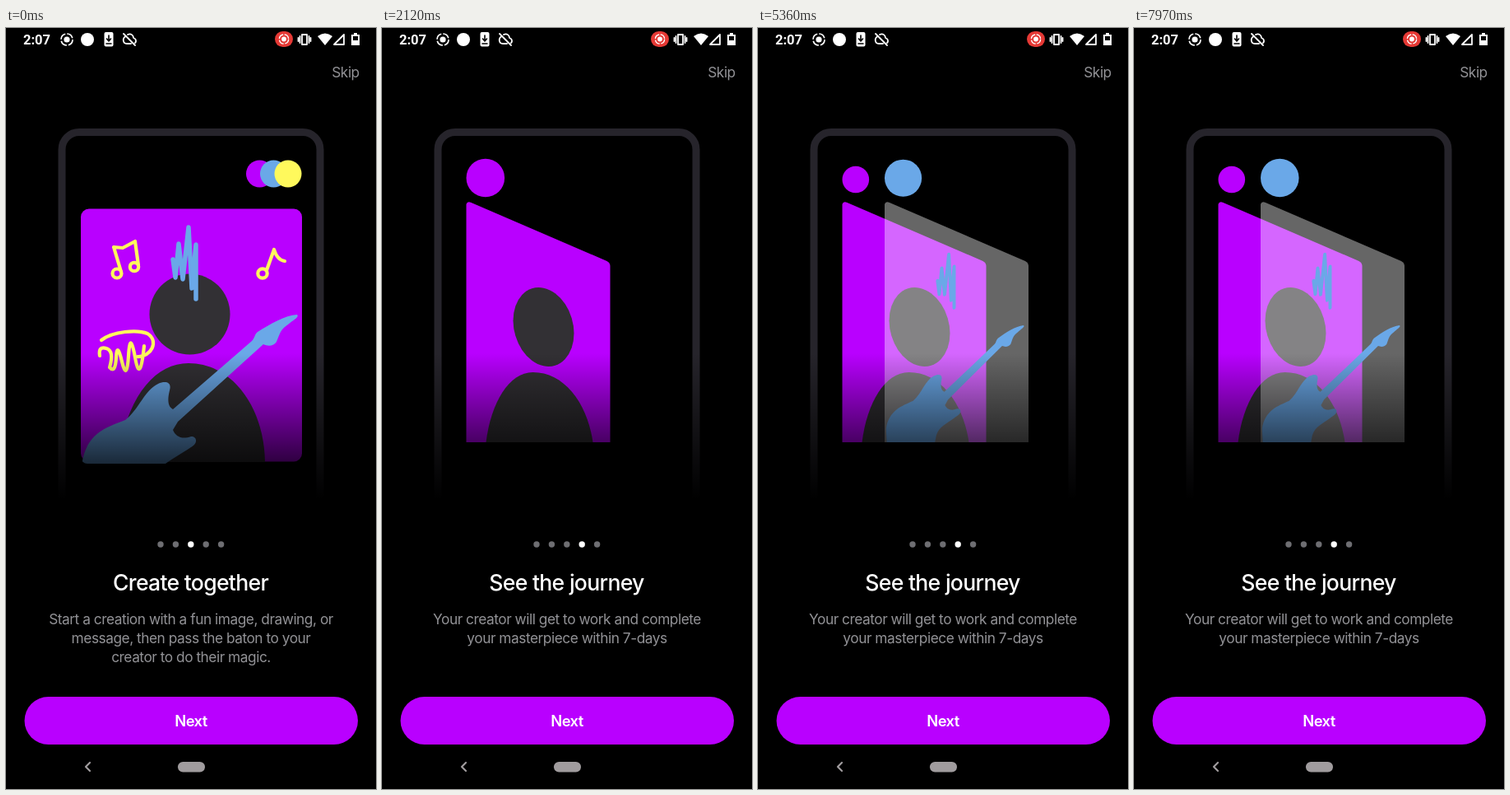
These frames come from a looping animation (450x924 px, 8 s). An HTML page:

```html
<!DOCTYPE html>
<html lang="en">
<head>
<meta charset="utf-8">
<title>Onboarding</title>
<style>
  html, body { margin: 0; width: 100%; height: 100%; overflow: hidden; background: #000; }
  svg { display: block; width: 100%; height: 100%; }
  text { font-family: Inter, "Open Sans", sans-serif; text-anchor: middle; }
  .title { font-size: 26.6px; font-weight: 500; letter-spacing: -.027em; fill: #fff; }
  .copy { font-size: 17.3px; letter-spacing: -.027em; fill: #929296; }
  .next { font-size: 18.4px; font-weight: 600; letter-spacing: -.03em; fill: #fff; }
  .clock { font: 700 16.5px Roboto, sans-serif; fill: #fff; }
  .line { fill: none; stroke-linecap: round; stroke-linejoin: round; }
  .yellow { stroke: #fff95c; stroke-width: 4.2; }
  .white { stroke: #fff; stroke-width: 1.8; }
</style>
</head>
<body>
<svg viewBox="0 0 450 924" preserveAspectRatio="none">
  <defs>
    <linearGradient id="fade" x2="0" y2="1">
      <stop offset="0" stop-opacity="0"/>
      <stop offset="1"/>
    </linearGradient>
    <clipPath id="cardClip"><rect x="91" y="219" width="269" height="310" rx="8"/></clipPath>
    <clipPath id="screenClip"><rect x="73" y="131" width="286.5" height="372"/></clipPath>
    <path id="phone" class="line" stroke="#26242b" stroke-width="9" d="M68 572V147.500a21 21 0 0 1 21-21H361a21 21 0 0 1 21 21V572"/>
    <path id="pane" d="M0 214Q1 210 6 212L171 283Q175 285 175 289V503H0Z"/>
    <path id="guitar" fill="#6aa8e8" d="M354 348C339 349 322 359 306 369C302 372 303 376 299 380L203 463C197 460 196 452 199 440C202 430 194 428 185 432C168 440 162 463 145 476C125 484 100 490 93 525V570H178L184 545Q187 535 194 529C205 521 222 512 229 506C233 501 231 496 225 496C214 500 206 496 203 488L209 478L313 384C319 387 326 386 329 381C334 370 333 367 343 360C350 354 357 351 354 348Z"/>
    <path id="hair" class="line" stroke="#6aa8e8" stroke-width="5.500" d="M203 281L206 303L210 262L215 305L222 242L226 316L231 263V329"/>
    <path id="scribble" class="line yellow" d="M116 379C130 368 160 366 172 371C187 380 176 400 160 399M114 398Q112 386 122 389T126 412Q133 420 134 400T141 405T149 398T157 400T168 386"/>
    <g id="target">
      <circle r="7" fill="none" stroke="#fff" stroke-width="1.700" stroke-dasharray="9 2"/>
      <circle r="3.600" fill="#fff"/>
    </g>
  </defs>

  <rect width="450" height="924"/>

  <g id="phoneOut">
    <use href="#phone"/>
    <circle cx="308.500" cy="177" r="16.500" fill="#b900ff"/>
    <circle cx="325.500" cy="177" r="16.500" fill="#6aa8e8"/>
    <circle cx="343" cy="177" r="16.500" fill="#fff95c"/>
    <rect x="91" y="219.500" width="269" height="307" rx="10" fill="#b900ff"/>
    <circle cx="223.500" cy="347.500" r="49" fill="#323034"/>
    <path fill="#323034" d="M136 527C145 450 180 407 222 407C275 407 314 460 315 527Z"/>
    <use href="#hair"/>
    <use href="#guitar" clip-path="url(#cardClip)"/>
    <g class="line yellow">
      <circle cx="135" cy="298" r="5.500"/>
      <circle cx="156" cy="290" r="5.200"/>
      <path d="M140 296L131 266L142 267L157 259L161 288"/>
      <circle cx="312" cy="298" r="5.700"/>
      <path d="M317 294L326 269Q330 282 339 283"/>
    </g>
    <use href="#scribble"/>
  </g>

  <g id="phoneIn">
    <use href="#phone"/>
    <g clip-path="url(#screenClip)">
      <g class="layer">
        <use href="#pane" fill="#b900ff"/>
        <circle r="49" fill="#323034" transform="matrix(.755 .16 0 .965 94 363)"/>
        <path fill="#323034" d="M24 503C30 455 52 418 81 418C119 418 147 455 154 503Z"/>
      </g>
      <g class="layer">
        <use href="#pane" fill="#fff" fill-opacity=".4"/>
        <use href="#hair" transform="matrix(.72 -.13 0 .76 -81.800 119.700)"/>
        <use href="#guitar" transform="matrix(.662 -.042 .0316 .647 -76.400 150.800)"/>
      </g>
      <g class="layer">
        <use href="#pane" fill="#fff" fill-opacity=".4"/>
        <g fill="#fff95c">
          <circle cx="31" cy="327" r="7"/>
          <circle cx="52" cy="317.500" r="6.700"/>
          <circle cx="129" cy="362" r="7"/>
        </g>
        <path class="line yellow" d="M36 324L28 294Q42 298 51 287L56 315M134 358L143 333Q145 341 153 345"/>
        <use href="#scribble" transform="matrix(.88 0 0 .81 -86.400 94.700)"/>
      </g>
      <circle class="badge" fill="#b900ff"/>
      <circle class="badge" fill="#6aa8e8"/>
      <circle class="badge" fill="#fff95c"/>
    </g>
  </g>
  <rect y="395" width="450" height="177" fill="url(#fade)"/>
  <rect y="571" width="450" height="30"/>

  <g id="dots"></g>

  <text id="titleOut" class="title" x="224.500" y="683">Create together</text>
  <text id="titleIn" class="title" x="224.500" y="683">See the journey</text>
  <g id="copyOut" class="copy">
    <text x="225" y="724">Start a creation with a fun image, drawing, or</text>
    <text x="225" y="747">message, then pass the baton to your</text>
    <text x="225" y="770">creator to do their magic.</text>
  </g>
  <g id="copyIn" class="copy">
    <text x="225" y="724">Your creator will get to work and complete</text>
    <text x="225" y="747">your masterpiece within 7-days</text>
  </g>

  <text class="copy" x="413" y="60">Skip</text>
  <rect x="22.500" y="812" width="405.500" height="58" rx="29" fill="#b900ff"/>
  <text class="next" x="225" y="848">Next</text>
  <path class="line" stroke="#a09c9e" stroke-width="2.200" d="M102 892L97 897L102 902"/>
  <rect x="209" y="891" width="33" height="12.500" rx="6.200" fill="#a09c9e"/>

  <!-- status bar -->
  <text class="clock" x="37.500" y="20">2:07</text>
  <use href="#target" x="74" y="14"/>
  <circle cx="99" cy="14" r="8" fill="#fff"/>
  <rect x="119.500" y="5" width="11" height="17.500" rx="2" fill="#fff"/>
  <path class="line" stroke="#000" stroke-width="1.600" d="M125 9V15M122.500 13L125 16L127.500 13M122 19H128"/>
  <path class="line white" d="M143 7L157 21M146 10C141 12 142 19 147 19H152M148 8C152 6 155 9 155 12C158 13 159 16 157 18"/>
  <rect x="327" y="4" width="22" height="19" rx="9.500" fill="#e53935"/>
  <use href="#target" transform="translate(338 13.500) scale(.8)"/>
  <path class="line white" d="M360 8H366V20H360ZM357.500 10V18M368.500 10V18M355.500 12V16M370.500 12V16"/>
  <path fill="#fff" d="M379 10Q388 3 397 10L388 21Z"/>
  <path class="line white" d="M411 8V20H399Z"/>
  <path fill="#fff" d="M423 6H427V8H430V21H420V8H423Z"/>
  <rect x="422" y="10" width="6" height="5"/>

  <g id="touch">
    <circle r="15.500" fill="#777" opacity=".3"/>
    <circle r="12" fill="#707070"/>
  </g>
</svg>
<script>
  const LOOP = 8000, TICK = 10, MOVE = 810, TRAVEL = 352;
  const REST_X = [102.5, 154, 206.5];
  const ENTER_AT = [1305, 3250, 5190];
  const LEAVE_AT = 7130;
  // time, share of the page swipe
  const SWIPE = [[30, 0], [120, .03], [210, .1], [300, .24], [420, .5],
                 [480, .65], [540, .79], [600, .885], [700, .965], [820, 1]];
  const $ = id => document.getElementById(id);
  const all = name => [...document.querySelectorAll(name)];
  const layers = all('.layer'), badges = all('.badge');
  const clamp = v => Math.min(1, Math.max(0, v));
  const ease = v => (1 - Math.cos(Math.PI * clamp(v))) / 2;
  const move = (el, x, y = 0) => el.setAttribute('transform', `translate(${x} ${y})`);

  const dots = Array.from({ length: 5 }, (_, i) => {
    const dot = document.createElementNS('http://www.w3.org/2000/svg', 'circle');
    dot.setAttribute('cx', 188 + i * 18.4);
    dot.setAttribute('cy', 627);
    dot.setAttribute('r', 3.7);
    return $('dots').appendChild(dot);
  });

  function sample(steps, t) {
    const i = steps.findIndex(s => s[0] > t);
    if (i < 0) return steps[steps.length - 1][1];
    if (i === 0) return steps[0][1];
    const [t0, a] = steps[i - 1], [t1, b] = steps[i];
    return a + (b - a) * (t - t0) / (t1 - t0);
  }

  function render(t) {
    const p = sample(SWIPE, t), rest = 1 - p;
    move($('phoneOut'), -506 * p);
    move($('titleOut'), -422 * p);
    move($('copyOut'), -452 * p);
    move($('phoneIn'), 624 * rest);
    move($('titleIn'), 712 * rest);
    move($('copyIn'), 712 * rest);

    const active = p < .45 ? 2 : 3;
    dots.forEach((dot, i) => dot.setAttribute('fill', i === active ? '#fff' : '#6e6e72'));

    $('touch').style.display = t >= 30 && t < 480 ? '' : 'none';
    move($('touch'), 412 - 426 * p, 548);

    const shown = ENTER_AT.map(at => ease((t - at) / MOVE));
    shown[2] -= ease((t - LEAVE_AT) / MOVE);
    layers.forEach((layer, i) => {
      const x = REST_X[i] + TRAVEL * (1 - shown[i]);
      const shrink = shown[i + 1] || 0;
      const r = 23.3 - 7 * shrink;
      move(layer, x);
      badges[i].setAttribute('r', r);
      move(badges[i], x + r, 182 + 2 * shrink);
    });
  }

  const start = performance.now();
  function tick() {
    const elapsed = (performance.now() - start) % LOOP;
    render(Math.floor(elapsed / TICK) * TICK);
    requestAnimationFrame(tick);
  }
  tick();
</script>
</body>
</html>
```
